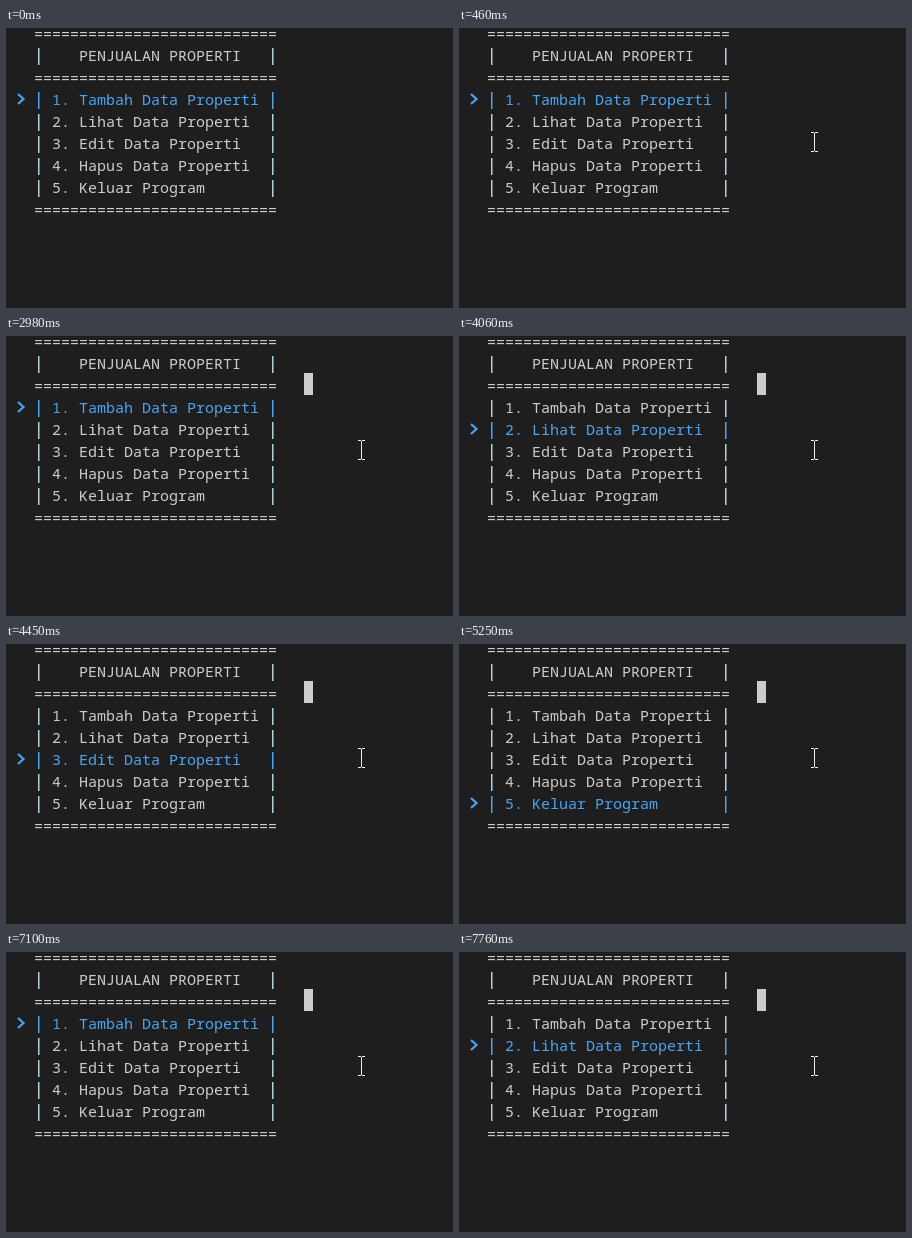
Recreate the animation shown at these times as an HTML page with a canvas. Size 447 by 280 pixels, loop 8000 ms.

```html
<!DOCTYPE html>
<html lang="id">
<head>
<meta charset="utf-8">
<title>Menu terminal</title>
<style>
  html, body { margin: 0; width: 100%; height: 100%; overflow: hidden; background: #1e1e1e; }
  canvas { display: block; }
</style>
</head>
<body>
<canvas id="stage" width="447" height="280"></canvas>
<script>
const ctx = document.getElementById('stage').getContext('2d');
const LOOP = 8000;
const CELL = 9, LINE = 22, LEFT = 28, BASE = 11;
const BG = '#1e1e1e', FG = '#cccccc', PIPE = '#b2d2da', BLUE = '#4aa5f3';

const RULE = '='.repeat(27);
const ROWS = [
  RULE,
  '|    PENJUALAN PROPERTI   |',
  RULE,
  '| 1. Tambah Data Properti |',
  '| 2. Lihat Data Properti  |',
  '| 3. Edit Data Properti   |',
  '| 4. Hapus Data Properti  |',
  '| 5. Keluar Program       |',
  RULE
];
const FIRST_ITEM = 3;

// [start time, value]
const SELECTION = [[0, 0], [4060, 1], [4450, 2], [4920, 3], [5250, 4],
                   [5910, 3], [6370, 2], [6770, 1], [7100, 0], [7760, 1]];
const POINTER = [[0, null], [130, [385, 246]], [195, [367, 150]],
                 [260, [358, 115]], [460, [355, 114]]];
const CLICK = [2850, 2980];
const FOCUS = 2910;

function valueAt(track, t) {
  let value = track[0][1];
  for (const [start, v] of track) if (t >= start) value = v;
  return value;
}

function drawRow(text, row, selected) {
  const y = BASE + row * LINE;
  [...text].forEach((ch, col) => {
    const x = LEFT + col * CELL;
    if (ch === '|') {
      ctx.fillStyle = selected ? BLUE : PIPE;
      ctx.fillRect(x + 4, y - 13, 1.5, 17);
    } else if (ch !== ' ') {
      ctx.fillStyle = selected ? BLUE : FG;
      ctx.fillText(ch, x, y);
    }
  });
  if (selected) drawChevron(y - 6);
}

function drawChevron(y) {
  ctx.strokeStyle = BLUE;
  ctx.lineWidth = 2.2;
  ctx.beginPath();
  ctx.moveTo(12, y - 5);
  ctx.lineTo(17.5, y);
  ctx.lineTo(12, y + 5);
  ctx.stroke();
}

function drawHighlight([x, y]) {
  ctx.fillStyle = '#968c16';
  ctx.beginPath();
  ctx.arc(x, y, 15, 0, Math.PI * 2);
  ctx.fill();
}

function drawPointer([x, y]) {
  ctx.fillStyle = '#f2f2f2';
  ctx.fillRect(x, y - 9, 1, 18);
  for (const edge of [y - 10, y + 9]) {
    ctx.fillRect(x - 3, edge, 3, 1);
    ctx.fillRect(x + 1, edge, 3, 1);
  }
}

function draw(t) {
  ctx.fillStyle = BG;
  ctx.fillRect(0, 0, 447, 280);
  ctx.font = '15px "Noto Sans Mono", "DejaVu Sans Mono", monospace';
  ctx.textBaseline = 'alphabetic';

  const active = FIRST_ITEM + valueAt(SELECTION, t);
  ROWS.forEach((text, row) => drawRow(text, row, row === active));

  if (t >= FOCUS) {
    ctx.fillStyle = FG;
    ctx.fillRect(298, 37, CELL, LINE);
  }
  const pointer = valueAt(POINTER, t);
  if (t >= CLICK[0] && t < CLICK[1]) drawHighlight(pointer);
  if (pointer) drawPointer(pointer);
}

const begin = performance.now();
function tick() {
  draw((performance.now() - begin) % LOOP);
  requestAnimationFrame(tick);
}
tick();
</script>
</body>
</html>
```
